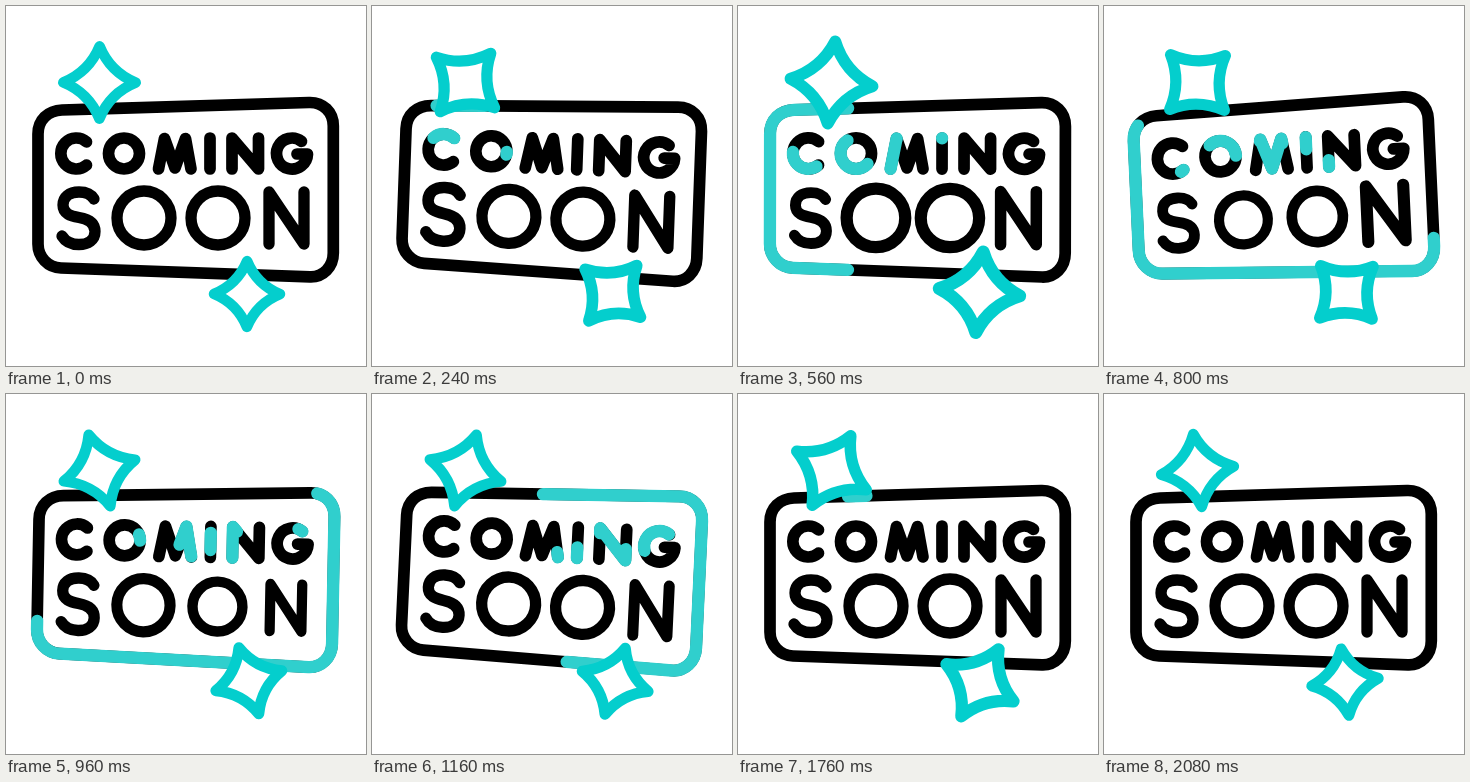
An HTML page for the animation above (2.12 s loop, 360x360 px).

```html
<!DOCTYPE html>
<html lang="en">
<head>
<meta charset="utf-8">
<title>Coming soon</title>
<style>
  html, body { margin: 0; width: 100%; height: 100%; overflow: hidden; background: #fff; }
  svg { display: block; width: 100vw; height: 100vh; }
  path { fill: none; stroke: #000; stroke-width: 11.7; stroke-linecap: round; stroke-linejoin: round; }
  .glow { stroke: #30cfcd; stroke-width: 12.3; }
  .star { fill: #fff; stroke: #04cecd; stroke-width: 10.5; }
  .big { stroke-width: 11.3; }
</style>
</head>
<body>
<svg viewBox="0 0 360 360" role="img" aria-label="Coming soon">
  <g id="sign"></g>
  <g id="stars"></g>
</svg>
<script>
const LOOP = 2120;
const sign = document.getElementById('sign');

const border = 'M110 102.4L56 104C42 104.5 32 114 32 128V238C32 251 42 261.5 55 262' +
  'L304 270.8C317 271.3 327.3 261 327.3 247V120C327.3 106 317 96 303 96.5Z';

const coming = [
  'M80.5 135.8A15.5 15.5 0 1 0 80.5 159.2',
  'M133.5 147.5a15.5 15.5 0 0 1-31 0a15.5 15.5 0 0 1 31 0',
  'M152.5 163L158.5 132.5L169 162L179.5 132.5L185 163',
  'M204 132V163',
  'M226 163V132L252.5 163V132',
  'M295.5 135.3A15.5 15.5 0 1 0 301.5 148H291'
];

// Each letter with the centre it grows from.
const soon = [
  ['M88 193C85 188 79 186 73 186C63 186 57 191 57 199C57 208 65 210 73 211.5' +
   'C82 213 89 217 89 225.5C89 234 82 238.5 73 238.5C65 238.5 59 235 56 230', 73],
  ['M111 212a27 27 0 0 1 54 0a27 27 0 0 1-54 0', 138],
  ['M185 212a27 27 0 0 1 54 0a27 27 0 0 1-54 0', 212],
  ['M263 238V186L298 238V186', 280.5]
];

function addPath(parent, d, cls) {
  const p = document.createElementNS('http://www.w3.org/2000/svg', 'path');
  p.setAttribute('d', d);
  if (cls) p.setAttribute('class', cls);
  return parent.appendChild(p);
}

// A black line with a teal segment that runs along it.
function addTraced(d, start, span, lag) {
  addPath(sign, d);
  const el = addPath(sign, d, 'glow');
  return { el, start, span, lag, length: el.getTotalLength() };
}

function starPath(r) {
  const c = r * 0.29;
  return `M${-r} 0Q${-c} ${-c} 0 ${-r}Q${c} ${-c} ${r} 0Q${c} ${c} 0 ${r}Q${-c} ${c} ${-r} 0Z`;
}

function addStar(x, y, r, grow, offset) {
  const el = addPath(document.getElementById('stars'), starPath(r), 'star');
  return { el, x, y, grow, offset };
}

const traced = [
  addTraced(border, 55, 1310, 510),
  ...coming.map((d, i) => addTraced(d, i * 175, 640, 250))
];

const letters = soon.map(([d, x], i) => ({ el: addPath(sign, d, 'big'), x, start: 160 + i * 110 }));

const stars = [
  addStar(93.5, 76.5, 36.2, 0.145, '0 0'),
  addStar(242, 287.5, 33, 0.24, '-1 .5')
];

// Keys: time and value.
const sway = [[0, 0], [380, 3], [750, -3], [1090, 3], [1440, 0]];
const bounce = [[0, 1], [250, 1.1], [500, 0.9], [750, 1]];

function ease(x) {
  x = Math.min(1, Math.max(0, x));
  return x * x * (3 - 2 * x);
}

function valueAt(keys, t) {
  let value = keys[0][1];
  for (let i = 1; i < keys.length; i++) {
    const [t0, a] = keys[i - 1], [t1, b] = keys[i];
    value += (b - a) * ease((t - t0) / (t1 - t0));
  }
  return value;
}

function draw(t) {
  sign.setAttribute('transform', `rotate(${valueAt(sway, t)} 180 182)`);

  for (const { el, start, span, lag, length } of traced) {
    const head = ease((t - start) / span) * length;
    const tail = ease((t - start - lag) / span) * length;
    const size = head - tail;
    el.style.visibility = size > 0.05 ? 'visible' : 'hidden';
    el.style.strokeDasharray = `${size} ${length * 2}`;
    el.style.strokeDashoffset = -tail;
  }

  for (const { el, x, start } of letters) {
    const s = valueAt(bounce, t - start);
    el.setAttribute('transform', `translate(${x} 212) scale(${s}) translate(${-x} -212)`);
  }

  const half = LOOP / 2;
  const pulse = 1 - Math.abs((t % half) / half * 2 - 1);
  for (const { el, x, y, grow, offset } of stars) {
    el.setAttribute('transform',
      `translate(${x} ${y}) rotate(${t / LOOP * 360}) scale(${1 + grow * pulse}) translate(${offset})`);
  }
}

const began = performance.now();
function tick() {
  draw((performance.now() - began) % LOOP);
  requestAnimationFrame(tick);
}
tick();
</script>
</body>
</html>
```
